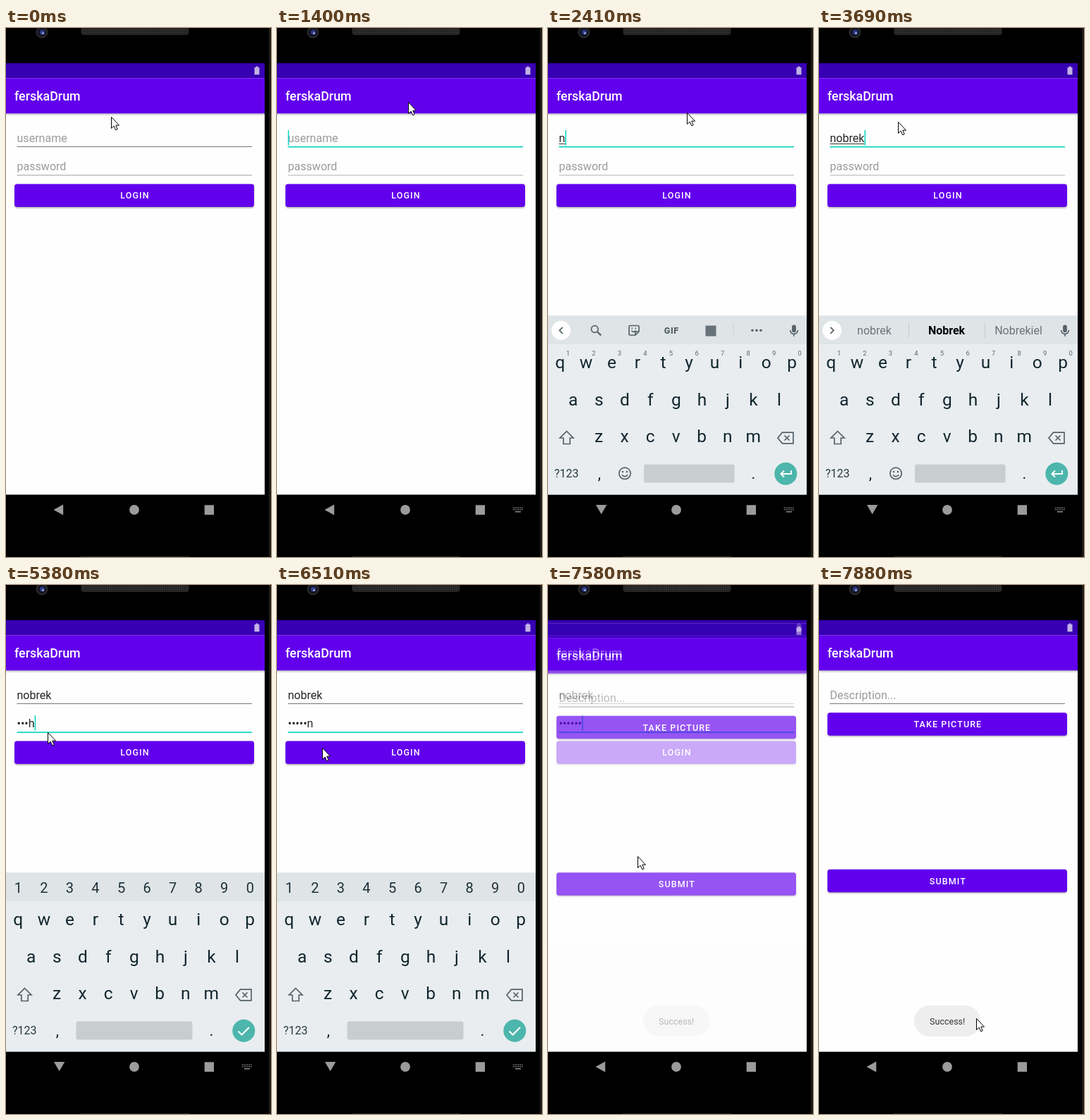
An HTML page that plays this animation: 376 by 751 pixels, repeating every 8 s.

```html
<!DOCTYPE html>
<html lang="en">
<head>
<meta charset="utf-8">
<title>Login on a phone</title>
<style>
  html, body { margin: 0; width: 100%; height: 100%; overflow: hidden; background: #000; }
  svg { display: block; width: 376px; height: 751px; font-family: Roboto, "Noto Sans", sans-serif; }
  text { white-space: pre; }
  .mid { text-anchor: middle; }
  .hint { font-size: 16.07px; fill: #9b9b9b; }
  .typed { font-size: 16.07px; fill: #262626; }
  .cap { font-size: 12.5px; font-weight: 500; letter-spacing: 1.11px; fill: #fff; }
  .key { font-size: 24.5px; fill: #11262d; }
  .word { font-size: 16px; fill: #69747a; }
  .icon { fill: none; stroke: #566268; stroke-width: 1.7; }
</style>
</head>
<body>
<svg id="stage" viewBox="0 0 376 751"></svg>
<script>
const LOOP = 8000;
const USER = "nobrek";
const PASS = "mokhen";
const stage = document.getElementById("stage");

const refreshes = [
  [150, 420, 3], [700, 700, 1], [1010, 1670, 6], [1950, 1950, 1], [2410, 2810, 3],
  [3270, 4270, 8], [4420, 4830, 3], [5380, 5530, 2], [6090, 7030, 8], [7180, 7880, 6]
].flatMap(([a, b, n]) => Array.from({ length: n }, (_, i) => a + (n > 1 ? (b - a) * i / (n - 1) : 0)));

// Pointer path: time, x, y.
const pointerPath = [
  [0, 149, 126], [150, 143, 133], [285, 132, 145], [420, 127, 149], [690, 127, 149], [700, 116, 154],
  [1010, 124, 147], [1142, 160, 114], [1274, 186, 105], [1400, 197, 120], [3150, 197, 120],
  [3690, 84, 137], [4270, 61, 204], [4420, 59, 209], [5960, 59, 209], [6640, 65, 237],
  [7190, 65, 237], [7880, 223, 615]
];

const rect = (x, y, w, h, fill, more = "") =>
  `<rect x="${x}" y="${y}" width="${w}" height="${h}" fill="${fill}" ${more}/>`;
const text = (x, y, s, cls, more = "") => `<text x="${x}" y="${y}" class="${cls}" ${more}>${s}</text>`;
const circle = (x, y, r, fill) => `<circle cx="${x}" cy="${y}" r="${r}" fill="${fill}"/>`;
const path = (d, more = 'class="icon"') => `<path d="${d}" ${more}/>`;
const group = (id, body) => `<g id="${id}">${body}</g>`;
const row = (chars, x, y, cls, more) =>
  [...chars].map((c, i) => text(x + i * 36.55, y, c, `mid ${cls}`, more)).join("");

const button = (y, label) =>
  rect(12.5, y + 1.3, 339, 32.5, "#000", 'rx="3.5" opacity=".35" filter="url(#soft)"') +
  rect(12, y, 340, 32.5, "#6200ee", 'rx="3.5"') +
  text(182.9, y + 20.8, label, "mid cap");

const frame = () =>
  rect(0, 50, 367, 613, "#fefefe") +
  rect(0, 121, 367, 4, "url(#shade)") +
  rect(0, 50, 367, 21.3, "#3700b3") +
  rect(0, 71.3, 367, 50, "#6200ee") +
  path("M352.5 56h2v-1.5h3V56h2v10.3h-7z", 'fill="#c3b1e6"') +
  text(12, 103, "ferskaDrum", "", 'font-size="17.86" font-weight="500" fill="#fff"');

const login = frame() +
  text(15.5, 161.8, "username", "hint", 'id="userHint"') +
  text(15.5, 161.8, "", "typed", 'id="user"') +
  rect(15.5, 164, 0, 1, "#333", 'id="compose"') +
  rect(15.5, 168, 333.5, 1, "#777", 'id="userLine"') +
  text(15.5, 202.2, "password", "hint", 'id="passHint"') +
  text(15.5, 202.2, "", "typed", 'id="pass"') +
  rect(15.5, 208.5, 333.5, 1, "#a69b9b", 'id="passLine"') +
  rect(15.5, 145, 1.6, 21.5, "#14d6c4", 'id="caret"') +
  button(221.6, "LOGIN") +
  rect(12, 221.6, 340, 32.5, "#fff", 'id="press" rx="3.5" opacity="0"');

const post = frame() +
  text(15.5, 161.8, "Description...", "hint") +
  rect(15.5, 168, 333.5, 1, "#777") +
  button(181.3, "TAKE PICTURE") +
  button(403.8, "SUBMIT");

const mic = path("M349 421.5a2.9 2.9 0 0 1 2.9 2.9v4.8a2.9 2.9 0 0 1-5.8 0v-4.8a2.9 2.9 0 0 1 2.9-2.9z", 'fill="#566268"') +
  path("M343.6 429a5.4 5.4 0 0 0 10.8 0M349 434.5v3.3");

const tools = circle(18.5, 429.3, 13.5, "#fff") + path("M20.8 424.8l-4.5 4.5 4.5 4.5") +
  `<circle cx="66.3" cy="427.5" r="4.8" class="icon"/>` + path("M70 431.2l5.2 5.2", 'class="icon" style="stroke-width:2.2"') +
  path("M116.5 422.5h11q1.5 0 1.5 1.5v7l-5 5h-7.500q-1.500 0-1.500-1.500v-10.500q0-1.500 1.500-1.500zM129 431h-5v5M118.500 429.500q3 4 6 0M118.500 426.300h1.500M123.500 426.300h1.500") +
  text(175.3, 433.8, "GIF", "mid", 'font-size="12.5" font-weight="800" letter-spacing=".6" fill="#566268"') +
  rect(223.5, 422.5, 15, 15, "#667278") +
  rect(262.5, 419, 1, 21, "#ccd2d5") +
  [290, 296, 302].map(x => circle(x, 429.3, 1.8, "#566268")).join("") + mic;

const words = circle(18.5, 429.3, 13.5, "#fff") + path("M16.3 424.8l4.5 4.5-4.5 4.5") +
  text(78.5, 435.2, USER, "mid word") +
  text(181, 435.2, "Nobrek", "mid word", 'style="fill:#000;font-weight:700"') +
  text(283, 435.2, "Nobrekiel", "mid word") +
  rect(127, 419, 1, 21, "#c5cbce") + rect(235, 419, 1, 21, "#c5cbce") + mic;

const plainKeys = row("1234567890", 28.3, 465, "", 'font-size="9.5" fill="#5b696f"') +
  `<circle cx="109" cy="632.300" r="8.200" class="icon"/>` +
  circle(106, 630, 1.3, "#566268") + circle(112, 630, 1.3, "#566268") + path("M104.700 634.200q4.300 5 8.600 0") +
  rect(136, 619.5, 128.5, 26, "#c8cdd0", 'rx="3"') +
  path("M345 628v5h-14M335 628.500l-4.500 4.500 4.500 4.500", 'fill="none" stroke="#fff" stroke-width="2"');

const passKeys = row("1234567890", 17.3, 437, "", 'font-size="20" fill="#1d3239"') +
  rect(99.5, 619.5, 165, 26, "#c8cdd0", 'rx="3"') +
  path("M329.500 633.500l5 5 10.500-10.500", 'fill="none" stroke="#fff" stroke-width="2"');

const keyboard = rect(0, 408, 367, 255, "#e9edf0") + rect(0, 408.5, 367, 40.5, "#dfe4e7") +
  row("qwertyuiop", 17.3, 483.3, "key") +
  row("asdfghjkl", 35.7, 535.8, "key") +
  row("zxcvbnm", 72, 588.3, "key") +
  path("M26.500 572.500l9.500 9.500h-4.800v8.500h-9.400v-8.500h-4.800z") +
  path("M332.500 574.200h15.500v15.600h-15.500l-6.500-7.800zM335.500 578.500l7 7M342.500 578.500l-7 7") +
  text(26.3, 638.3, "?123", "mid", 'font-size="16" fill="#26393f"') +
  text(72.8, 640, ",", "mid", 'font-size="22" fill="#11262d"') +
  text(291.5, 640, ".", "mid", 'font-size="22" fill="#11262d"') +
  circle(337.3, 632.8, 16, "#4db6ac") +
  group("plainKeys", plainKeys) + group("passKeys", passKeys) +
  group("tools", tools) + group("words", words);

const keyDots = [0, 1].map(r => Array.from({ length: 6 }, (_, i) =>
  rect(334.8 + i * 2.5, 680.5 + r * 2.6, 1.4, 1.4, "#8c8c8c")).join("")).join("");

const nav = rect(0, 662.7, 376, 88.3, "#000") +
  path("", 'id="back" fill="#9b9b9b"') +
  circle(182, 684, 6.9, "#9b9b9b") + rect(281.7, 677.3, 13.3, 13.7, "#9b9b9b") +
  group("keyIcon", keyDots + rect(338, 686, 8, 1.5, "#8c8c8c"));

const bezel = rect(0, 0, 376, 50, "#000") + rect(367, 0, 9, 751, "#000") +
  rect(372.5, 0, 3.5, 751, "url(#edge)") +
  circle(51, 6, 8.6, "#27272a") + circle(51, 6, 6, "#11121f") + circle(51.5, 6, 3.6, "#303c85") + circle(52.5, 7.5, 1.4, "#a5aee0") +
  rect(106.5, -4, 153, 14, "#252525", 'rx="4"') + rect(107.5, 1, 151, 7.5, "url(#mesh)", 'rx="3"') +
  rect(106, 750, 154, 1, "#262626");

stage.innerHTML = `<defs>
  <filter id="soft" x="-5%" y="-20%" width="110%" height="150%"><feGaussianBlur stdDeviation=".9"/></filter>
  <linearGradient id="shade" x2="0" y2="1"><stop stop-color="#000" stop-opacity=".25"/><stop offset="1" stop-color="#000" stop-opacity="0"/></linearGradient>
  <linearGradient id="edge"><stop stop-color="#0b0a09"/><stop offset=".5" stop-color="#25221e"/><stop offset="1" stop-color="#151310"/></linearGradient>
  <pattern id="mesh" width="3" height="3" patternUnits="userSpaceOnUse"><rect width="3" height="3" fill="#303030"/><circle cx="1.5" cy="1.5" r=".9" fill="#161616"/></pattern>
  <clipPath id="screen"><rect y="50" width="367" height="612.7"/></clipPath>
</defs>
<rect width="376" height="751"/>
<g clip-path="url(#screen)">` +
  group("login", login) + group("post", post) + group("keyboard", keyboard) +
  group("toast", rect(135, 597, 94.500, 44, "#eeeeee", 'rx="22"') +
    text(182.2, 624, "Success!", "mid", 'font-size="12.5" fill="#333"')) +
`</g>` + nav + bezel +
  group("pointer", path("M.5 .5V16.500L4.200 13.200 6.700 18.800 9.200 17.700 6.800 12.200H11.500Z", 'fill="#fff" stroke="#000" stroke-width="1"'));

const ui = {};
stage.querySelectorAll("[id]").forEach(el => ui[el.id] = el);

const ramp = (t, a, b) => Math.min(1, Math.max(0, (t - a) / (b - a)));
const show = (el, on) => el.setAttribute("visibility", on ? "visible" : "hidden");
const set = (el, attrs) => { for (const k in attrs) el.setAttribute(k, attrs[k]); };

function pointerAt(t) {
  const i = pointerPath.findIndex(p => p[0] > t);
  if (i < 0) return pointerPath[pointerPath.length - 1].slice(1);
  const [a, b] = [pointerPath[i - 1], pointerPath[i]];
  const k = ramp(t, a[0], b[0]);
  return [a[1] + (b[1] - a[1]) * k, a[2] + (b[2] - a[2]) * k];
}

function setLine(el, y, focused, idle) {
  set(el, { y: focused ? y - 0.2 : y, height: focused ? 1.8 : 1, fill: focused ? "#14d6c4" : idle });
}

function draw(now) {
  const t = refreshes.reduce((last, s) => s <= now + 0.5 ? s : last, 0);
  const onUser = t >= 1010 && t < 4100;
  const onPass = t >= 4100;

  const userCount = t < 2410 ? 0 : t < 2600 ? 1 : t < 2800 ? 3 : 6;
  const passCount = t < 4800 ? 0 : t < 5380 ? 1 : t < 5530 ? 4 : 6;
  const hidden = t >= 7025 ? passCount : Math.max(0, passCount - 1);
  ui.user.textContent = USER.slice(0, userCount);
  ui.pass.textContent = "•".repeat(hidden) + PASS.slice(hidden, passCount);
  show(ui.userHint, !userCount);
  show(ui.passHint, !passCount);

  const userWidth = userCount ? ui.user.getComputedTextLength() : 0;
  const width = onPass ? (passCount ? ui.pass.getComputedTextLength() : 0) : userWidth;
  set(ui.compose, { width: onUser ? userWidth : 0 });
  setLine(ui.userLine, 168, onUser, "#777");
  setLine(ui.passLine, 208.5, onPass, t < 1010 ? "#a69b9b" : "#b9b0b0");

  const blinkOff = (t >= 1950 && t < 2410) || (t >= 6090 && t < 6600);
  set(ui.caret, { x: 15.5 + width, y: onPass ? 185 : 145 });
  show(ui.caret, (onUser || onPass) && !blinkOff);
  set(ui.press, { opacity: t >= 7025 && t < 7300 ? 0.18 : 0 });

  const raised = ramp(t, 1400, 1670) - ramp(t, 7180, 7460);
  set(ui.keyboard, { transform: `translate(0 ${255 * (1 - raised) ** 2})` });
  show(ui.keyboard, raised > 0);
  set(ui.plainKeys, { display: onPass ? "none" : "inline" });
  set(ui.passKeys, { display: onPass ? "inline" : "none" });
  set(ui.tools, { display: !onPass && t < 2500 ? "inline" : "none" });
  set(ui.words, { display: !onPass && t >= 2500 ? "inline" : "none" });

  set(ui.back, { d: raised > 0 ? "M68 677H83.300L75.650 690.300Z" : "M67.500 684L81.200 676.500V691.500Z" });
  show(ui.keyIcon, t >= 1140 && t < 7450);

  const opened = ramp(t, 7180, 7600);
  set(ui.post, { opacity: opened, transform: `translate(0 ${40 * (1 - opened) ** 2})` });
  set(ui.toast, { opacity: ramp(t, 7320, 7740) });

  const [x, y] = pointerAt(t);
  set(ui.pointer, { transform: `translate(${Math.round(x)} ${Math.round(y)})` });
}

const start = performance.now();
function tick() {
  draw((performance.now() - start) % LOOP);
  requestAnimationFrame(tick);
}
tick();
</script>
</body>
</html>
```
